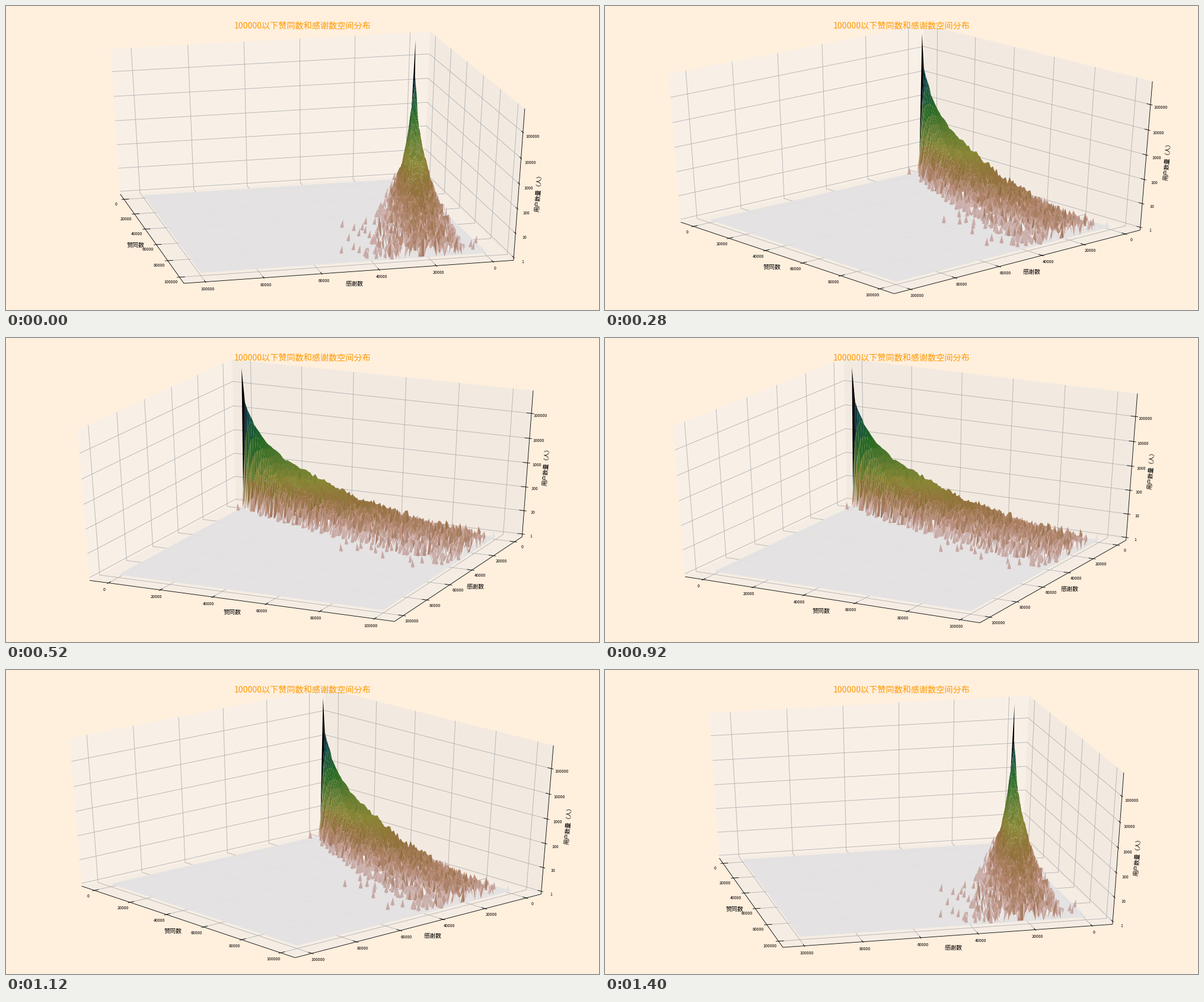
Recreate the animation shown at these times as a matplotlib script. Size 1000x512 px, loop 1.8 s.

```python
import numpy as np
import matplotlib.pyplot as plt
from matplotlib.animation import FuncAnimation
from matplotlib.collections import LineCollection, PolyCollection

W, H, DPI = 1000, 512, 100
BG = "#ffefdd"
FONT = "Noto Sans CJK JP"
EDGE = 0.5 + 1 / 48          # half size of the padded box
TOP = 5.78                   # decades covered by the vertical axis
DIST, ELEV = 10, np.radians(30)


def px(size):
    return size * 72 / DPI


def project(u, v, w, az):
    """Perspective view of box coordinates; returns pixels and distance."""
    right = u * np.sin(az) + v * np.cos(az)
    near = u * np.cos(az) - v * np.sin(az)
    up = w * np.cos(ELEV) - near * np.sin(ELEV)
    d = DIST - near * np.cos(ELEV) - w * np.sin(ELEV)
    x = (right / d + 0.095) / 0.185 * W
    y = (0.09 - up / d) / 0.185 * H
    return np.stack([x, y], axis=-1), d


def path(points, az):
    return project(*np.array(points, float).T, az)[0]


def along(f):
    return (f - 0.5) / 1.1


def make_heights():
    """Decades of users per cell: a ridge near y = 0.2 x that fades with x."""
    rng = np.random.default_rng(12)
    n = np.arange(101)
    peak = 10 ** np.interp(n, [0, 1, 2, 4, 9, 19, 31, 51, 75, 100],
                           [TOP, 4.42, 4.1, 3.7, 2.98, 2.3, 1.83, 1.12, 0.62, 0.36])
    i, j = np.meshgrid(n, n, indexing="ij")
    ratio = (j + 0.5) / (i + 0.5)
    spread = 0.06 + 0.18 / np.sqrt(i + 1)
    f = np.exp(-0.5 * ((np.sqrt(ratio) - 0.45) / spread) ** 2)
    f /= f.max(axis=1, keepdims=True)
    count = rng.poisson(peak[:, None] * f + 0.012 * (ratio < 0.45))
    for a, b in [(57, 40), (88, 48), (85, 43), (0, 6)]:
        count[a, b] = 1
    z = np.log10(count + 1)
    z[0, 0] = TOP
    return z


def corners(a):
    return np.stack([a[:-1, :-1], a[1:, :-1], a[1:, 1:], a[:-1, 1:]], axis=-1)


# Surface: only raised cells are kept, the flat rest is one polygon
heights = make_heights()
grid = np.linspace(0, 1, 101)
gu, gv = np.meshgrid(along(grid), along(1 - grid), indexing="ij")
cu, cv, cz = corners(gu), corners(gv), corners(heights)
raised = cz.max(axis=-1) > 0
cu, cv, cz = cu[raised], cv[raised], cz[raised]
cw = cz / TOP - 0.5

base = plt.get_cmap("gist_earth")(1 - cz[:, 0] / TOP)[:, :3]
slope = cz[:, 1] + cz[:, 3] - 2 * cz[:, 0]
light = np.clip(0.9 + 0.06 * slope, 0.4, 1)
cell_colors = (0.4 * base + 0.6 * base ** 2) * light[:, None]

fig = plt.figure(figsize=(W / DPI, H / DPI), dpi=DPI, facecolor=BG)
ax = fig.add_axes([0, 0, 1, 1])
ax.set_xlim(0, W)
ax.set_ylim(H, 0)
ax.axis("off")

E = EDGE
PANES = [
    [(-E, -E, -E), (-E, E, -E), (-E, E, E), (-E, -E, E)],
    [(-E, E, -E), (E, E, -E), (E, E, E), (-E, E, E)],
    [(-E, -E, -E), (E, -E, -E), (E, E, -E), (-E, E, -E)],
]
AXES = [
    [(-E, -E, -E), (E, -E, -E)],
    [(E, -E, -E), (E, E, -E)],
    [(E, E, -E), (E, E, E)],
]
a = along(0)
FLOOR = [(a, a, -0.5), (-a, a, -0.5), (-a, -a, -0.5), (a, -a, -0.5)]

ticks_u = along(np.arange(6) / 5)
ticks_v = -ticks_u
ticks_w = np.arange(6) / TOP - 0.5
OUT, IN = E + 0.1 / 12, E - 0.2 / 12

grid_lines, tick_lines = [], []
for u in ticks_u:
    grid_lines.append([(u, -E, -E), (u, E, -E), (u, E, E)])
    tick_lines.append([(u, -OUT, -E), (u, -IN, -E)])
for v in ticks_v:
    grid_lines.append([(E, v, -E), (-E, v, -E), (-E, v, E)])
    tick_lines.append([(OUT, v, -E), (IN, v, -E)])
for w in ticks_w:
    grid_lines.append([(-E, -E, w), (-E, E, w), (E, E, w)])
    tick_lines.append([(OUT, E, w), (IN, E, w)])

panes = PolyCollection([], facecolors=[(g, g, g, 0.5) for g in (0.95, 0.9, 0.925)],
                       edgecolors="none", zorder=1)
rules = LineCollection([], colors="#b0b0b0", linewidths=px(0.85), zorder=2)
frame_lines = LineCollection([], colors="black", linewidths=px(0.85), zorder=3)
floor = PolyCollection([], facecolors=[(0.893, 0.886, 0.886, 0.95)],
                       edgecolors="none", zorder=4)
cells = PolyCollection([], edgecolors="none", linewidths=0, zorder=5)
for c in (panes, rules, frame_lines, floor, cells):
    ax.add_collection(c, autolim=False)

ax.text(500, 32, "100000以下赞同数和感谢数空间分布", color="#ff9900", fontsize=px(14.1),
        family=FONT, ha="center", va="center_baseline", zorder=8)

labels = []   # (text artist, box position, pixel shift)


def add_label(s, pos, size, shift=(0, 0)):
    t = ax.text(0, 0, s, fontsize=px(size), family=FONT, color="black",
                ha="center", va="center_baseline", zorder=7)
    labels.append((t, pos, np.array(shift)))
    return t


P, Q, R = E + 0.028, E + 0.022, E + 0.05
for k in range(6):
    add_label(str(20000 * k), (ticks_u[k], -P, -P), 6.8)
    add_label(str(20000 * k), (P, ticks_v[k], -P), 6.8)
    add_label(str(10 ** k), (Q, Q, ticks_w[k]), 6.8, (0, 4))
add_label("赞同数", (0, -R, -R), 10)
add_label("感谢数", (R, 0, -R), 10)
z_name = add_label("用户数量（人）", (R, R, 0), 9.6, (-2, 4))
z_name.set_va("center")


def azimuth(k):
    step = max(0, min(k, 13, 35 - k))
    return np.radians(np.interp(step, [0, 3, 7, 12, 13],
                                [13.6, 28.1, 41.4, 61.7, 65.1]))


def update(k):
    az = azimuth(k)
    panes.set_verts([path(p, az) for p in PANES])
    rules.set_segments([path(p, az) for p in grid_lines])
    frame_lines.set_segments([path(p, az) for p in AXES + tick_lines])
    floor.set_verts([path(FLOOR, az)])

    quads, depth = project(cu, cv, cw, az)
    order = np.argsort(-depth.mean(axis=1))
    cells.set_verts(quads[order])
    cells.set_facecolor(cell_colors[order])

    for t, pos, shift in labels:
        t.set_position(project(*pos, az)[0] + shift)
    low, high = path(AXES[2], az)
    z_name.set_rotation(np.degrees(np.arctan2(low[1] - high[1], high[0] - low[0])))
    return []


anim = FuncAnimation(fig, update, frames=45, interval=40, repeat=True,
                     repeat_delay=0, blit=False)
plt.show()
```
